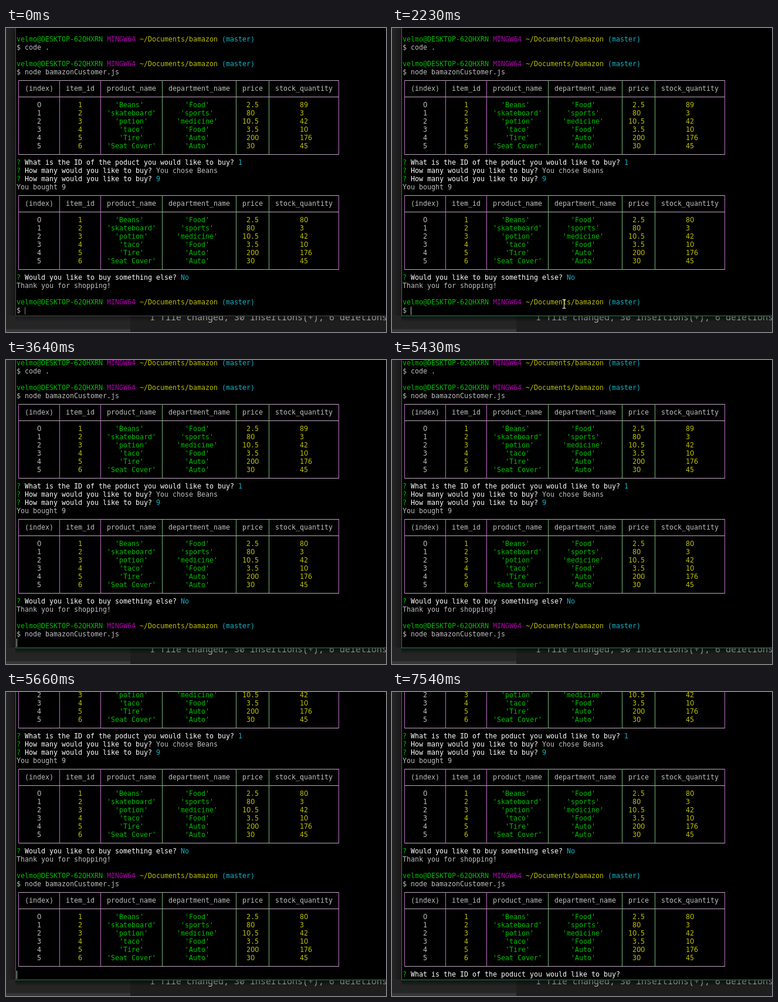
Recreate the animation shown at these times as an HTML page. Size 648 by 518 pixels, loop 8000 ms.

```html
<!DOCTYPE html>
<html lang="en">
<head>
<meta charset="utf-8">
<title>Terminal session</title>
<style>
  html, body { margin: 0; width: 100%; height: 100%; overflow: hidden; background: #1e1e1e; }
  svg { display: block; width: 648px; height: 518px; }
  text { white-space: pre; }
  .term { font: 11.63px "DejaVu Sans Mono", monospace; }
  .zero { font-family: "DejaVu Sans", sans-serif; letter-spacing: -.4px; }
  .editor { font: 15px "Noto Sans Mono", monospace; fill: #bdbdbd; }
</style>
</head>
<body>
<svg viewBox="0 0 648 518">
  <defs>
    <clipPath id="pane"><rect x="17" width="631" height="490"/></clipPath>
    <linearGradient id="below" x2="0" y2="1">
      <stop stop-opacity=".55"/><stop offset="1" stop-opacity="0"/>
    </linearGradient>
    <linearGradient id="beside">
      <stop stop-opacity="0"/><stop offset="1" stop-opacity=".35"/>
    </linearGradient>
  </defs>

  <rect width="648" height="518" fill="#1e1e1e"/>
  <rect width="212" height="518" fill="#252526"/>
  <rect y="513" width="212" height="5" fill="#363638"/>
  <text class="editor" x="245" y="498">1 file changed, 30 insertions(+), 6 deletions(-)</text>
  <rect y="0" width="16" height="490" fill="url(#beside)"/>
  <rect id="shadow" x="16" y="491" width="632" height="10" fill="url(#below)"/>

  <rect id="frame" x="16" width="632" height="491"/>
  <rect x="17" width="631" height="490"/>
  <g clip-path="url(#pane)">
    <g id="screen" class="term"></g>
    <rect id="caret" width="1"/>
  </g>

  <circle id="click" cx="291" cy="470" r="12" fill="#b4aa00" fill-opacity=".72"/>
  <g id="mouse" fill="none">
    <path d="M-3-7.5H-1Q0-7.5 0-6.5Q0-7.5 1-7.5H3M0-6.5V6.5M-3 7.5H-1Q0 7.5 0 6.5Q0 7.5 1 7.5H3" stroke="#f0f0e0" stroke-width="1.2"/>
  </g>
</svg>
<script>
const LOOP = 8000, CELL = 7, LINE = 14, LEFT = 18;
const C = {
  grey: '#bfbfbf', white: '#ffffff', green: '#00bf00', yellow: '#bfbf00',
  cyan: '#14b4c8', magenta: '#b400b4'
};
const $ = id => document.getElementById(id);
const screen = $('screen');

function add(parent, tag, attrs, content = '') {
  const el = document.createElementNS('http://www.w3.org/2000/svg', tag);
  for (const key in attrs) el.setAttribute(key, attrs[key]);
  el.textContent = content;
  return parent.appendChild(el);
}

const group = () => add(screen, 'g', {});

function put(parent, row, col, str, color) {
  const el = add(parent, 'text', { x: LEFT + col * CELL, y: row * LINE + 9, fill: C[color] });
  // the terminal face has a plain zero
  for (const part of str.split(/(0)/)) {
    if (part) add(el, 'tspan', part === '0' ? { class: 'zero' } : {}, part);
  }
}

// spans: color, text, color, text ...
function line(parent, row, ...spans) {
  let col = 0;
  for (let i = 0; i < spans.length; i += 2) {
    put(parent, row, col, spans[i + 1], spans[i]);
    col += spans[i + 1].length;
  }
}

function prompt(parent, row) {
  line(parent, row, 'green', 'velmo@DESKTOP-62QHXRN ', 'magenta', 'MINGW64 ',
    'yellow', '~/Documents/bamazon ', 'cyan', '(master)');
}

function ask(parent, row, question, color, answer) {
  line(parent, row, 'green', '? ', 'white', question + ' ', color, answer);
}

const EDGES = [0, 10, 20, 35, 53, 61, 78];
const HEAD = ['(index)', 'item_id', 'product_name', 'department_name', 'price', 'stock_quantity'];
const GOODS = [
  ['Beans', 'Food', '2.5', '89'],
  ['skateboard', 'sports', '80', '3'],
  ['potion', 'medicine', '10.5', '42'],
  ['taco', 'Food', '3.5', '10'],
  ['Tire', 'Auto', '200', '176'],
  ['Seat Cover', 'Auto', '30', '45']
];

function table(parent, row, beans) {
  const y = row * LINE + 5;
  const edgeX = col => LEFT + col * CELL + 3;
  for (const dy of [0, 2, 9]) {
    add(parent, 'rect', { x: edgeX(0), y: y + dy * LINE, width: 547, height: 1, fill: '#bfaabf' });
  }
  EDGES.forEach((col, i) => add(parent, 'rect', {
    x: edgeX(col), y, width: 1, height: 9 * LINE + 1,
    fill: i > 2 && i < 6 ? '#78b478' : '#bf6ec8'
  }));

  const cell = (r, i, str, color) => {
    const room = EDGES[i + 1] - EDGES[i] - 1 - str.length;
    const pad = i === 5 && str.length < 4 ? 7 : room >> 1;
    put(parent, r, EDGES[i] + 1 + pad, str, color);
  };
  HEAD.forEach((name, i) => cell(row + 1, i, name, 'grey'));
  GOODS.forEach(([name, dept, price, stock], n) => {
    const r = row + 3 + n;
    cell(r, 0, String(n), 'grey');
    cell(r, 1, String(n + 1), 'yellow');
    cell(r, 2, `'${name}'`, 'green');
    cell(r, 3, `'${dept}'`, 'green');
    cell(r, 4, price, 'yellow');
    cell(r, 5, n ? stock : beans, 'yellow');
  });
}

const WHICH = 'What is the ID of the poduct you would like to buy?';
const MANY = 'How many would you like to buy?';
const COMMAND = 'node bamazonCustomer.js ';

const past = group();
prompt(past, 1);
line(past, 2, 'grey', '$ code .');
prompt(past, 4);
line(past, 5, 'grey', '$ ' + COMMAND);
table(past, 6, '89');
ask(past, 16, WHICH, 'cyan', '1');
ask(past, 17, MANY, 'grey', 'You chose Beans');
ask(past, 18, MANY, 'cyan', '9');
line(past, 19, 'grey', 'You bought 9');
table(past, 20, '80');
ask(past, 30, 'Would you like to buy something else?', 'cyan', 'No');
line(past, 31, 'grey', 'Thank you for shopping!');
prompt(past, 33);
line(past, 34, 'grey', '$ ');

const typed = group();
put(typed, 34, 2, COMMAND, 'grey');
const listing = group();
table(listing, 35, '80');
const question = group();
ask(question, 45, WHICH, 'cyan', '');

// time, lines scrolled, caret column, caret lit
const STEPS = [
  [0, 0, 2, 1], [1680, 0, 2, 0], [2230, 0, 2, 1],
  [2310, 0, 26, 1], [2860, 0, 26, 0], [3390, 0, 26, 1],
  [3640, 1, 0, 1], [4330, 1, 0, 0], [4880, 1, 0, 1], [5430, 1, 0, 0],
  [5580, 11, 0, 0], [5660, 11, 0, 1],
  [5890, 11, 54, 1], [6450, 11, 54, 0], [7000, 11, 54, 1], [7540, 11, 54, 0]
];
const FOCUS = 1150, UNCLICK = 1220, ENTER = 190, TYPE = 2310, LIST = 5580, ASK = 5890;

const show = (el, on) => el.setAttribute('visibility', on ? 'visible' : 'hidden');

function moveMouse(t) {
  show($('mouse'), t >= ENTER && t < TYPE);
  const k = Math.max(0, Math.min(7, Math.floor((t - ENTER) / 80)));
  const left = (1 - k / 7) ** 2;
  $('mouse').setAttribute('transform',
    `translate(${(293.5 + 184 * left).toFixed(1)} ${(470 + 51 * left).toFixed(1)})`);
}

function render(t) {
  const [, scroll, col, lit] = STEPS.filter(s => s[0] <= t).pop();
  const focused = t >= FOCUS;
  screen.setAttribute('transform', `translate(0 ${-scroll * LINE})`);
  show(typed, t >= TYPE);
  show(listing, t >= LIST);
  show(question, t >= ASK);

  const caret = $('caret');
  show(caret, lit);
  caret.setAttribute('x', LEFT + col * CELL);
  caret.setAttribute('y', focused ? 475 : 476);
  caret.setAttribute('height', focused ? 14 : 12);
  caret.setAttribute('fill', focused ? C.grey : '#858585');

  $('frame').setAttribute('fill', focused ? '#168a4c' : '#484848');
  $('shadow').setAttribute('opacity', focused ? 1 : 0.6);
  show($('click'), focused && t < UNCLICK);
  moveMouse(t);
}

const start = performance.now();
function tick() {
  render((performance.now() - start) % LOOP);
  requestAnimationFrame(tick);
}
tick();
</script>
</body>
</html>
```
